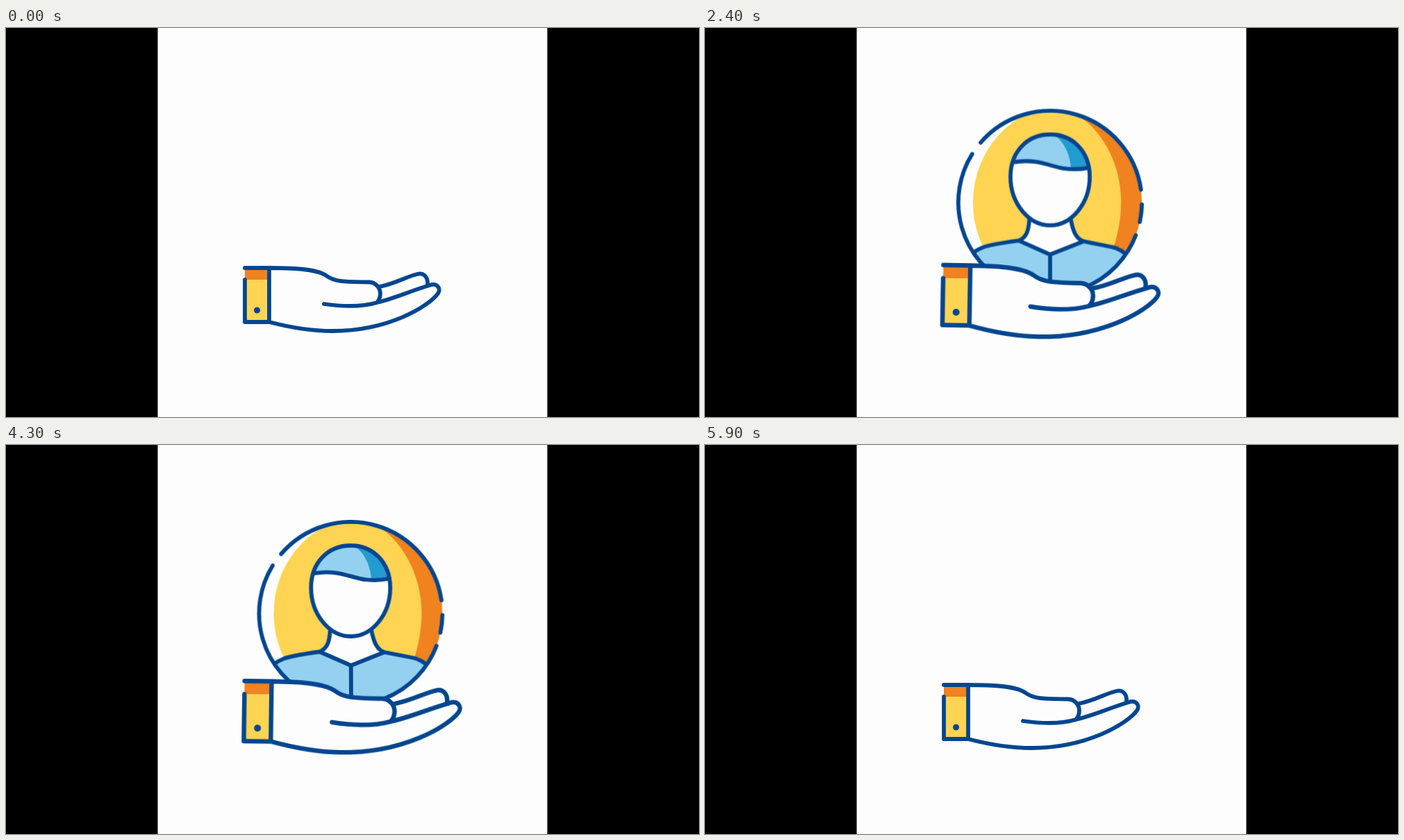
Write an HTML page that moves like this. It is 998 by 561 pixels and loops after 6 s.

```html
<!DOCTYPE html>
<html lang="en">
<head>
<meta charset="utf-8">
<title>Caring hand</title>
<style>
  html, body { margin: 0; width: 100%; height: 100%; overflow: hidden; background: #000; }
  svg { display: block; width: 100vw; height: 100vh; }
  .line { fill: none; stroke: #03468f; stroke-width: 5.8; stroke-linecap: round; stroke-linejoin: round; }
  .skin { fill: #fefdfe; }
  .sky { fill: #94d0f0; }
  .sea { fill: #219bd0; }
  .sun { fill: #ffd452; }
  .amber { fill: #f0821f; }
  .navy { fill: #03468f; }

  .hand, .ball, .person, .dot {
    transform-origin: 0 0;
    animation: 6s cubic-bezier(.37, 0, .63, 1) infinite paused;
  }
  .hand { animation-name: hand; }
  .ball { animation-name: ball; }
  .person { animation-name: person; }
  .dot { animation-name: dot; }

  @keyframes hand {
    0%, 1% { transform: translate(344px, 424px) rotate(0deg) scale(1); }
    10% { transform: translate(343px, 438.5px) rotate(1.7deg) scale(1.11); }
    13.333% { transform: translate(343px, 437px) rotate(1.64deg) scale(1.11); }
    23.333% { transform: translate(343px, 428px) rotate(1deg) scale(1.11); }
    35% { transform: translate(351px, 429px) rotate(2deg) scale(1.108); }
    44.167% { transform: translate(335px, 428px) rotate(.2deg) scale(1.11); }
    53.333% { transform: translate(352px, 429px) rotate(1.8deg) scale(1.108); }
    63.333%, 70% { transform: translate(343px, 428px) rotate(1.05deg) scale(1.11); }
    73.333% { transform: translate(342px, 426px) rotate(.5deg) scale(1.11); }
    81.667% { transform: translate(328px, 435px) rotate(26.6deg) scale(1.108); }
    93.333% { transform: translate(343px, 425px) rotate(.4deg) scale(1.04); }
    98.333%, 100% { transform: translate(344px, 424px) rotate(0deg) scale(1); }
  }
  @keyframes ball {
    0%, 1.667% { transform: translate(490px, 395px) rotate(0deg) scale(0); }
    8.333% { transform: translate(499px, 249px) rotate(-2deg) scale(1.02); }
    13.333% { transform: translate(499px, 257px) rotate(-.5deg) scale(.992); }
    23.333% { transform: translate(497px, 251px) rotate(0deg) scale(1); }
    35% { transform: translate(509px, 252.4px) rotate(2.4deg) scale(1.03); }
    44.167% { transform: translate(488px, 251px) rotate(-1.8deg) scale(.98); }
    53.333% { transform: translate(508px, 252px) rotate(2.6deg) scale(1.012); }
    63.333% { transform: translate(495px, 252px) rotate(1.2deg) scale(1); }
    70% { transform: translate(497px, 251px) rotate(0deg) scale(1); }
    73.333% { transform: translate(496px, 235px) rotate(-.5deg) scale(1); }
    81.667% { transform: translate(488.5px, 296.5px) rotate(-4.4deg) scale(.99); }
    90%, 100% { transform: translate(470px, 405px) rotate(-8deg) scale(0); }
  }
  @keyframes person {
    0%, 3.333% { transform: translateY(75px) scale(0); }
    10% { transform: translateY(76px) scale(.88); }
    13.333% { transform: translateY(77px) scale(.94); }
    18.333% { transform: translateY(75px) scale(1.02); }
    23.333%, 100% { transform: translateY(75px) scale(1); }
  }
  @keyframes dot {
    0%, 2% { transform: translate(495px, 370px) scale(0); animation-timing-function: ease-out; }
    6.667% { transform: translate(var(--m), var(--p)) scale(1); animation-timing-function: ease-in; }
    13.333% { transform: translate(var(--x), var(--y)) scale(1); animation-timing-function: linear; }
    16%, 100% { transform: translate(var(--x), 385px) scale(0); }
  }
</style>
</head>
<body>
<svg viewBox="0 0 998 561" preserveAspectRatio="none">
  <defs>
    <clipPath id="disc"><circle r="132"/></clipPath>
    <path id="head" d="M-57-35C-57-72-32-96 0-96S57-72 57-35C57 3 31 35 0 35S-57 3-57-35Z"/>
    <clipPath id="skull"><use href="#head"/></clipPath>
  </defs>
  <rect x="218.5" width="561" height="561" class="skin"/>

  <g class="ball">
    <g clip-path="url(#disc)">
      <circle r="132" class="skin"/>
      <ellipse cx="21" rx="132" ry="140" class="sun"/>
      <path class="amber" d="M30-132C75-108 102-55 102-2C102 25 97 48 89 72L140 90V-132Z"/>
      <g class="person">
        <g transform="translate(0 -77)">
          <path class="skin" d="M-30 26C-31 42-34 52-45 57L0 77L48 58C37 54 33 43 30 26Z"/>
          <path class="sky" d="M-124 88C-105 66-98 64-45 57L0 77L48 58L88 66C100 68 106 74 124 88V150H-124Z"/>
          <path class="line" d="M-124 88C-105 66-98 64-45 57L0 77L48 58L88 66C100 68 106 74 124 88M0 77V140
            M-30 28C-31 43-34 52-45 57M30 28C33 43 37 54 48 58"/>
          <use href="#head" class="skin"/>
          <g clip-path="url(#skull)">
            <path class="sky" d="M-60-56C-18-62 2-49 20-47C32-45 45-46 62-49V-100H-60Z"/>
            <path class="sea" d="M3-97C20-87 29-67 30-46C40-45 50-46 62-49V-100Z"/>
          </g>
          <path class="line" d="M-53-56C-18-62 2-49 20-47C32-45 45-46 56-48"/>
          <use href="#head" class="line"/>
        </g>
      </g>
    </g>
    <path class="line" id="ring"/>
  </g>

  <g id="dots"></g>

  <g class="hand">
    <g transform="translate(-344 -424)">
      <path class="skin" d="M532 373C560 369 578 358 592 355C602 352 608 360 607 371L540 398Z"/>
      <path class="line" d="M538 373C560 369 578 358 592 355C602 352 608 360 607 370"/>
      <path class="skin" d="M379 346C410 346 446 347 461 357C474 367 490 366 523 366.5C533 367 539 375 539 383
        C539 388 537 393 534 396C560 390 580 380 610 371C621 367 627 376 622 383C608 402 550 437 470 437C438 437 402 430 379 424Z"/>
      <path class="amber" d="M344 346H379V363H344Z"/>
      <path class="sun" d="M344 363H379V424H344Z"/>
      <path class="line" d="M344 346H379C410 346 446 347 461 357C474 367 490 366 523 366.5C533 367 539 375 539 383C539 388 537 393 534 396
        M458 398C486 402 511 403 534 396C560 390 580 380 610 371C621 367 627 376 622 383C608 402 550 437 470 437C438 437 402 430 379 424
        M344 363V424H379V346"/>
      <circle cx="361.5" cy="407" r="4.5" class="navy"/>
    </g>
  </g>
</svg>
<script>
  const $ = id => document.getElementById(id);
  const at = deg => {
    const a = deg * Math.PI / 180;
    return `${132 * Math.cos(a)} ${132 * Math.sin(a)}`;
  };
  const arc = (from, to) => `M${at(from)}A132 132 0 ${to - from > 180 ? 1 : 0} 1 ${at(to)}`;
  $('ring').setAttribute('d', arc(220.8, 352) + arc(1.3, 12.3) + arc(21, 211.9));

  // landing x, landing y, peak x, peak y
  const dots = [[410, 281, 425, 95], [437, 307, 455, 62], [556, 337, 545, 60], [605, 337, 585, 105]];
  $('dots').innerHTML = dots.map(([x, y, m, p]) =>
    `<circle r="10" class="dot line" style="fill:#fefdfe;--x:${x}px;--y:${y}px;--m:${m}px;--p:${p}px"/>`).join('');

  // Hold each pose for a tenth of a second
  const anims = document.getAnimations();
  const start = performance.now();
  function tick() {
    const t = Math.floor((performance.now() - start + 15) / 100) * 100 % 6000;
    for (const a of anims) a.currentTime = t;
    requestAnimationFrame(tick);
  }
  tick();
</script>
</body>
</html>
```
